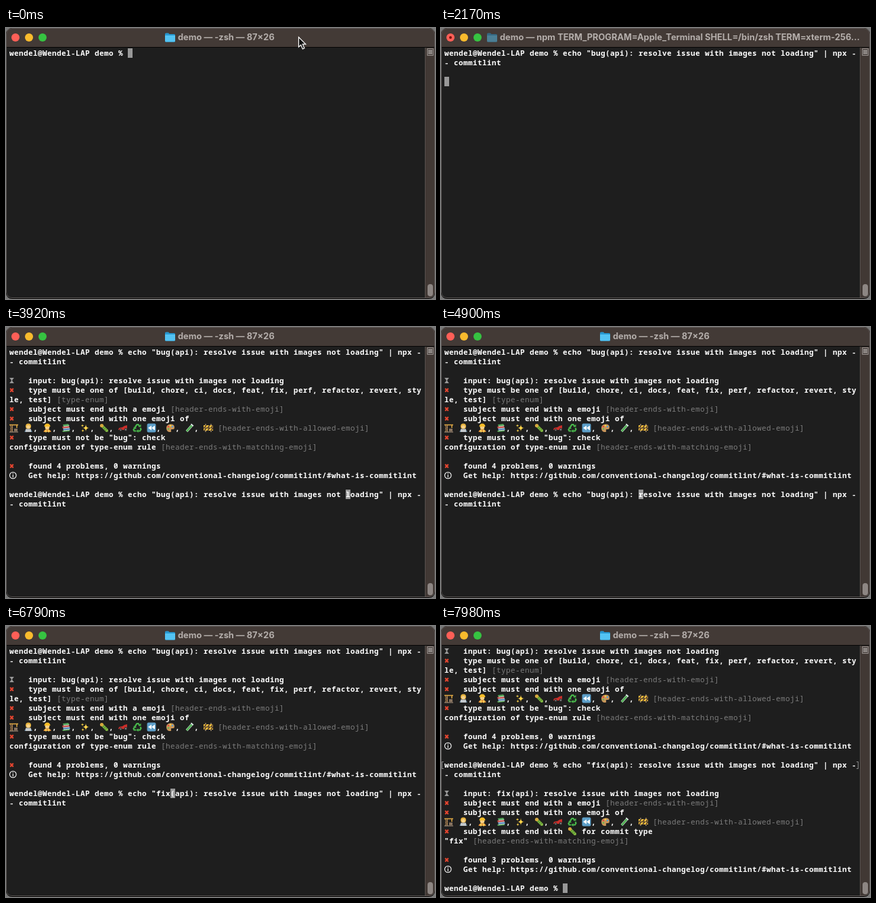
An HTML page that plays this animation: 634x400 px, repeating every 8 s.

```html
<!DOCTYPE html>
<html lang="en">
<head>
<meta charset="utf-8">
<title>Terminal</title>
<style>
html, body { margin: 0; width: 100%; height: 100%; overflow: hidden; background: #777; }
#win { position: absolute; left: 0; top: 0; width: 634px; height: 399px; overflow: hidden; border-radius: 9px; background: #1e1e1e; box-shadow: 0 1px #000; }
#win > * { position: absolute; }
#edge { inset: 0; border: 1px solid #5d5856; border-radius: 9px; box-sizing: border-box; }
#bar { left: 0; top: 0; width: 634px; height: 28px; background: #433a36; border-bottom: 1px solid #060606; }
#bar > * { position: absolute; }
.light { top: 8px; width: 12px; height: 12px; border-radius: 50%; }
#dot { left: 12px; top: 12px; width: 4px; height: 4px; border-radius: 50%; background: #7c120b; }
#folder { top: 7px; }
#title { top: 4px; font: 700 12.85px/20px Inter, sans-serif; color: #b4aeab; white-space: pre; }
#scroll { left: 619px; top: 29px; width: 15px; height: 371px; background: #413834; border-left: 1px solid #56504d; box-sizing: border-box; }
#thumb { left: 623px; top: 378px; width: 8px; height: 18px; border-radius: 4px; background: #8d8683; }
#cursor { width: 7px; height: 14px; background: #989898; }
/* 11px glyphs on a 7px grid */
#rows { left: 5px; top: 30px; width: 609px; font: 600 11px/14px "Noto Sans Mono", "DejaVu Sans Mono", monospace; letter-spacing: .4px; color: #fff; font-variant-ligatures: none; }
#rows div { position: relative; height: 14px; white-space: pre; }
#rows b { font-weight: 800; }
#rows s { color: #7c7c7c; font-weight: 500; text-decoration: none; }
#rows svg { width: 14px; height: 14px; vertical-align: top; overflow: visible; }
.mark::before, .mark::after { content: ""; position: absolute; top: 2px; width: 2px; height: 9px; border: 1px solid #858585; }
.mark::before { left: -4px; border-right: 0 !important; }
.mark::after { left: 609px; border-left: 0 !important; }
</style>
</head>
<body>
<div id="win">
  <div id="bar">
    <div class="light" style="left:8px;background:#fe5f57"></div>
    <div class="light" style="left:28px;background:#f9bb2d"></div>
    <div class="light" style="left:48px;background:#36c341"></div>
    <div id="dot"></div>
    <svg id="folder" width="15" height="14">
      <path d="M0 2q0-1.500 1.500-1.500h3.500l1.500 1.500h7q1.500 0 1.500 1.500v8.500q0 1.500-1.500 1.500h-12q-1.500 0-1.500-1.500z" fill="#2797cf"/>
      <path d="M0 4h15v8q0 1.500-1.500 1.500h-12q-1.500 0-1.500-1.500z" fill="#53c3f3"/>
    </svg>
    <div id="title"></div>
  </div>
  <div id="scroll"></div>
  <svg style="left:621px;top:29px" width="12" height="13"><path d="M1.500 1.500h9v10h-9z" fill="#5a5350" stroke="#8f8885"/><path d="M3 4.500h6M3 6.500h6M3 8.500h6" stroke="#b9b3b0"/></svg>
  <div id="thumb"></div>
  <div id="cursor"></div>
  <div id="rows"></div>
  <div id="edge"></div>
  <svg id="pointer" style="left:431px;top:12px" width="14" height="22"><path d="M1.500 1.500v14.500l3.300-3.100 2.600 6 2.600-1.100-2.600-5.900h4.500z" fill="#111" stroke="#fff" stroke-width="1.200"/></svg>
</div>
<script>
const LOOP = 8000, COLS = 87, ROWS = 26, CELL = 7, LINE = 14;
const PROMPT = 'wendel@Wendel-LAP demo % ';
const IDLE = 'demo — -zsh — 87×26';
const BUSY = 'demo — npm TERM_PROGRAM=Apple_Terminal SHELL=/bin/zsh TERM=xterm-256…';
const $ = id => document.getElementById(id);

const path = (d, fill) => `<path d="${d}" fill="${fill}"/>`;
const line = (d, color, width = 1) => `<path d="${d}" fill="none" stroke="${color}" stroke-width="${width}"/>`;
const disc = (x, y, r, fill) => `<circle cx="${x}" cy="${y}" r="${r}" fill="${fill}"/>`;
const star = (x, y, r) => path(`M${x} ${y - r}Q${x} ${y} ${x + r} ${y}Q${x} ${y} ${x} ${y + r}Q${x} ${y} ${x - r} ${y}Q${x} ${y} ${x} ${y - r}`, '#ffd54a');

const icons = {
  x: line('M1.200 4.700l4.600 5M5.800 4.700l-4.600 5', '#e5452f', 2),
  wait: line('M.5 3.500h6M.5 10.500h6', '#999') + path('M1 4h5l-2 3 2 3h-5l2-3z', '#999'),
  info: line('M.5 7a4.800 4.800 0 1 0 9.600 0a4.800 4.800 0 1 0-9.600 0M5.300 3.800v1.300M5.300 6v4.200', '#fff', 1.1),
  crane: line('M2 2v11M4.500 2v11M2 4l2.500 2-2.500 2 2.500 2-2.500 2', '#a98052') + line('M0 2.500h13M11 3v4', '#e0a843', 1.5) + path('M7 8h5v4h-5z', '#86725f') + line('M0 13h13', '#b8a088'),
  dev: disc(7, 4.500, 4, '#e8b540') + disc(7, 5.500, 2.600, '#f8d28b') + path('M1.500 13q0-4 5.500-4t5.500 4z', '#6d8fa8') + path('M3 8.500h8v4.500h-8z', '#c3c8cc'),
  hat: disc(7, 6, 3.300, '#f7cf83') + path('M2.500 5q.5-4.500 4.500-4.500t4.500 4.500z', '#f8bd27') + path('M1.500 13q.5-4 5.500-4t5.500 4z', '#e8963a') + line('M5 9.500v4M9 9.500v4', '#f4e266', 1.5),
  books: path('M2 2l8-1 2 3-9 1z', '#55a85a') + path('M1 5l10-1 1 3-10 1z', '#c34c48') + path('M2 8l10-1 1 3-10 1z', '#4f86b8') + path('M1 11l11-1v2l-10 1z', '#53a354') + line('M3 5l8-1M3 8l9-1M3 11l9-1', '#eee', .8),
  spark: star(8, 7, 5.500) + star(3, 3.500, 2.500) + star(3.500, 11, 2.500),
  bug: line('M3 3L11 11', '#79b43c', 4) + disc(3.500, 3.500, 2.600, '#d5a83d') + disc(11, 11, 2, '#86bd44') + line('M5 7l2-2M7 9l2-2M9 11l2-2', '#46782b'),
  car: path('M0 10l1-3 5-1 3-2 4-1v7z', '#c92f2b') + disc(3.500, 10, 2, '#333') + disc(11, 9.500, 2.300, '#333') + disc(3.500, 10, .8, '#aaa') + disc(11, 9.500, .9, '#aaa'),
  loop: line('M4 5.500l2.500-3.500h2l2 3M11.500 7l1 2-1.500 2.500h-3M5.500 11.500h-3l-1-2 2-3', '#49b64b', 2.2) + path('M8.500 5.500h4v-4zM8.500 9v5l-3-2.500zM1 6l4-1 .5 4z', '#49b64b'),
  back: '<rect x=".5" y=".5" width="13" height="13" rx="2" fill="#5d9fc9"/>' + path('M7 3.500v7l-5-3.500zM12 3.500v7l-5-3.500z', '#fff'),
  art: path('M1 7q0-5 6-5.500t6 5q0 3-3 2.500t-2 2-3 2q-4-1-4-6', '#c9965a') + disc(4, 5, 1.200, '#e4483d') + disc(7, 3.500, 1.200, '#f8d33e') + disc(10, 5, 1.200, '#4ea1df') + disc(4, 8.500, 1.200, '#5eb552'),
  tube: line('M11.500 2.500L3 12', '#c8d6d3', 3.6) + line('M10.500 3.500L3 12', '#4eb14f', 2.6) + line('M9.500 1l3.500 3', '#e2ebea', 1.3),
  fence: line('M3 1v12M11 1v12', '#a08b6a', 1.5) + path('M0 3h14v3.500h-14zM0 7.500h14v3.500h-14z', '#f4c03a') + line('M1 7l3-4M6 7l3-4M11 7l3-4M1 11l3-4M6 11l3-4M11 11l3-4', '#4c3931', 1.5),
};
const markup = text => text.replace(/\{(\w+)\}/g, (_, name) => `<svg viewBox="0 0 14 14">${icons[name]}</svg>`);

const ENDS = '{x}  subject must end with ';
const EMOJI = '{crane} {dev}, {hat}, {books}, {spark}, {bug}, {car} {loop} {back}, {art}, {tube}, {fence} <s>[header-ends-with-allowed-emoji]</s>';
const ending = [ENDS + 'a emoji <s>[header-ends-with-emoji]</s>', ENDS + 'one emoji of', EMOJI];

const report = (type, problems, count) => [
  '',
  `{wait}  input: <b>${type}(api): resolve issue with images not loading</b>`,
  ...problems,
  '',
  `{x}  <b>found ${count} problems, 0 warnings</b>`,
  '{info}  Get help: https://github.com/conventional-changelog/commitlint/#what-is-commitlint',
  '',
];
const bugReport = report('bug', [
  '{x}  type must be one of [build, chore, ci, docs, feat, fix, perf, refactor, revert, sty',
  'le, test] <s>[type-enum]</s>',
  ...ending,
  '{x}  type must not be "bug": check',
  'configuration of type-enum rule <s>[header-ends-with-matching-emoji]</s>',
], 4);
const fixReport = report('fix', [
  ...ending,
  ENDS + '{bug} for commit type',
  '"fix" <s>[header-ends-with-matching-emoji]</s>',
], 3);

const command = type => `echo "${type}(api): resolve issue with images not loading" | npx -- commitlint`;
const wrap = text => [text.slice(0, COLS), text.slice(COLS)].filter(Boolean);

// Phases: time, finished lines, typed text, cursor offset in it, busy title
const first = wrap(PROMPT + command('bug'));
const history = [...first, ...bugReport];
const second = wrap(PROMPT + command('fix'));
const ran = [...history, '[' + second[0], second[1]];
const steps = [];
const at = (time, past, type, cursor, busy = false) => steps.push({ time, past, type, cursor, busy });

at(0, [], null, 0);
at(1050, [], 'bug', 74);
at(1890, first, undefined, 0);
at(1960, [...first, ''], undefined, 0, true);
at(2730, history, null, 0);
at(3150, history, 'bug', 74);
// Word jumps backwards
[[3290, 64], [3430, 61], [3640, 57], [3850, 46], [4060, 42], [4270, 35], [4480, 30], [4690, 24], [4900, 16], [5110, 6],
 [5250, 7], [5390, 8], [5460, 9]].forEach(([time, cursor]) => at(time, history, 'bug', cursor));
// Replace the type
[[5740, 'bu'], [5950, 'b'], [6090, ''], [6300, 'f'], [6510, 'fi'], [6790, 'fix']]
  .forEach(([time, type]) => at(time, history, type, 6 + type.length));
at(7070, ran, undefined, 0);
at(7140, [...ran, ''], undefined, 0, true);
at(7910, [...ran, ...fixReport], null, 0);

function draw({ time, past, type, cursor, busy }) {
  const prompt = type === undefined ? '' : PROMPT;
  const input = type == null ? '' : command(type);
  const lines = [...past, ...(prompt ? wrap(prompt + input) : [''])];
  const skip = Math.max(0, lines.length - ROWS);
  const cell = prompt.length + cursor;
  $('rows').innerHTML = lines.slice(skip).map(text =>
    text[0] === '[' ? `<div class="mark">${text.slice(1)}</div>` : `<div>${markup(text)}</div>`).join('');
  $('cursor').style.left = 5 + cell % COLS * CELL + 'px';
  $('cursor').style.top = 30 + (past.length - skip + Math.floor(cell / COLS)) * LINE + 'px';
  $('title').textContent = busy ? BUSY : IDLE;
  $('title').style.left = busy ? '87px' : '254px';
  $('folder').style.left = busy ? '68px' : '235px';
  $('folder').style.opacity = busy ? .5 : 1;
  $('dot').hidden = !busy;
  $('pointer').style.display = time < 1050 ? '' : 'none';
}

let shown;
function tick() {
  const t = performance.now() % LOOP;
  const step = steps.findLast(s => s.time <= t);
  if (step !== shown) draw(shown = step);
  requestAnimationFrame(tick);
}
tick();
</script>
</body>
</html>
```
